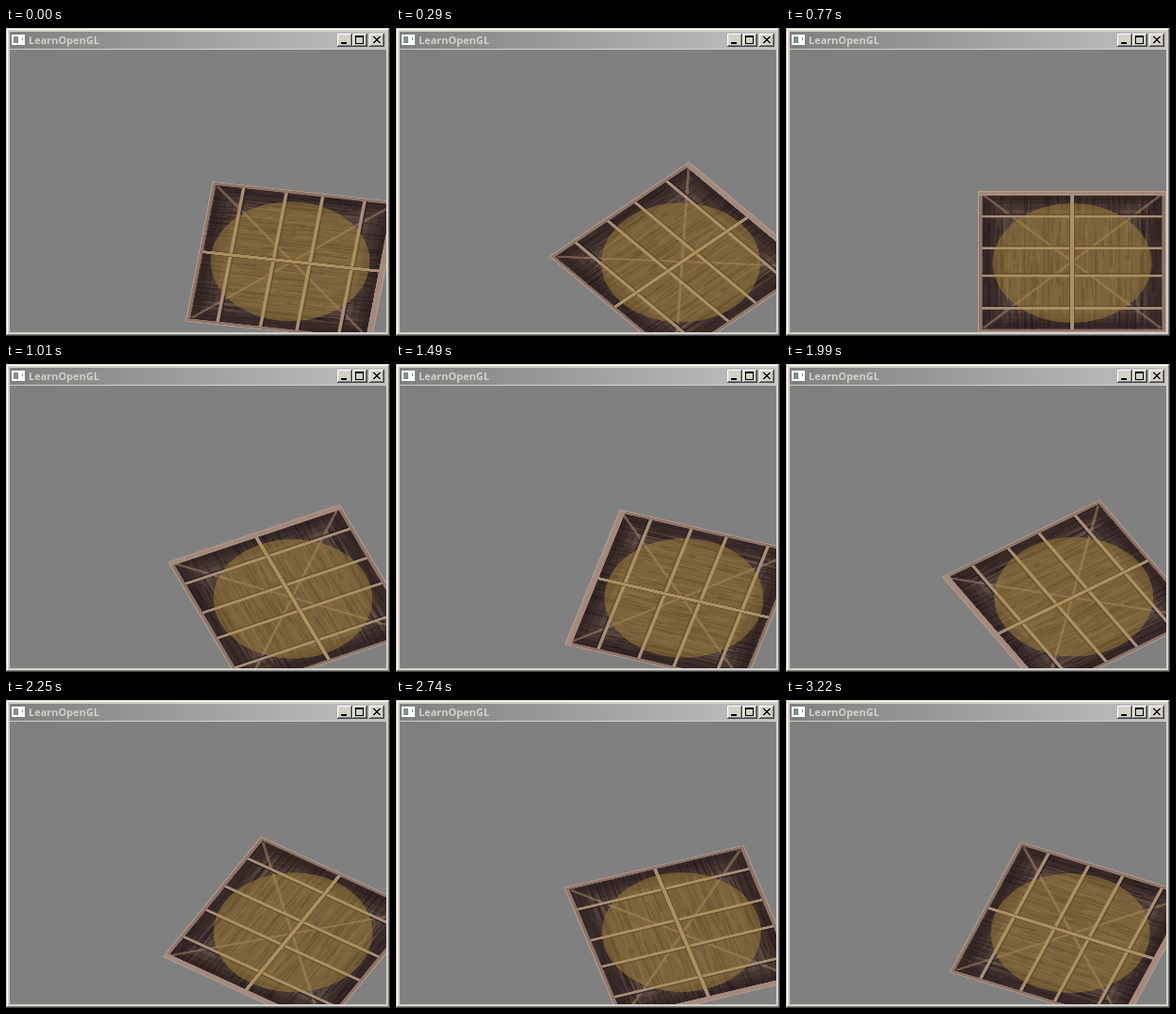
An HTML page with a canvas for the animation above (3.47 s loop, 408 by 327 pixels).

```html
<!DOCTYPE html>
<html lang="en">
<head>
<meta charset="utf-8">
<title>LearnOpenGL</title>
<style>
  html, body { margin: 0; width: 100%; height: 100%; overflow: hidden; background: #d4d0c8; }
  svg, canvas { position: absolute; left: 0; top: 0; display: block; }
  canvas { left: 4px; top: 23px; }
  text { font: 700 11px "Open Sans", sans-serif; fill: #d4d0c8; }
</style>
</head>
<body>
<svg width="408" height="327" shape-rendering="crispEdges">
  <defs>
    <linearGradient id="caption">
      <stop stop-color="#808080"/>
      <stop offset="1" stop-color="#c0c0c0"/>
    </linearGradient>
    <g id="button">
      <path fill="#404040" d="M0 0h16v14H0z"/>
      <path fill="#fff" d="M0 0h15v13H0z"/>
      <path fill="#808080" d="M1 1h14v12H1z"/>
      <path fill="#d4d0c8" d="M1 1h13v11H1z"/>
    </g>
  </defs>
  <path fill="#404040" d="M0 0h408v327H0z"/>
  <path fill="#d4d0c8" d="M0 0h407v326H0z"/>
  <path fill="#808080" d="M1 1h406v325H1z"/>
  <path fill="#fff" d="M1 1h405v324H1z"/>
  <path fill="#d4d0c8" d="M2 2h404v323H2z"/>
  <path fill="url(#caption)" d="M4 4h400v18H4z"/>
  <path fill="#fff" d="M6 7h14v11H6z"/>
  <path fill="#78908d" d="M8 9h5v7H8zM17 10h1v3h-1z"/>
  <text x="24" y="17">LearnOpenGL</text>
  <use href="#button" x="352" y="6"/>
  <use href="#button" x="368" y="6"/>
  <use href="#button" x="386" y="6"/>
  <path d="M356 15h6v2h-6z"/>
  <path fill-rule="evenodd" d="M371 8h9v9h-9zM372 10v6h7v-6z"/>
  <path d="M389.5 9h2l7 7h-2zM396.5 9h2l-7 7h-2z"/>
</svg>
<canvas id="view" width="400" height="300"></canvas>
<script>
const LOOP = 3470;
const STEPS = [0, 40, 290, 530, 770, 1010, 1250, 1490, 1740, 1990, 2250, 2490, 2740, 2980, 3220];
const ANGLES = [81.7, 107, 132, 156, 180, 204, 228.5, 253, 278, 303, 328.5, 353, 377.5, 402.5, 427.8];

let seed = 11;
const random = () => (seed = seed * 16807 % 2147483647) / 2147483647;

// The crate is painted once, in units from -100 to 100.
function paintCrate() {
  const canvas = document.createElement("canvas");
  canvas.width = canvas.height = 400;
  const c = canvas.getContext("2d");
  c.setTransform(2, 0, 0, 2, 200, 200);

  const rect = (color, x, y, w, h) => {
    c.fillStyle = color;
    c.fillRect(x, y, w, h);
  };
  const line = (color, width, x1, y1, x2, y2) => {
    c.strokeStyle = color;
    c.lineWidth = width;
    c.beginPath();
    c.moveTo(x1, y1);
    c.lineTo(x2, y2);
    c.stroke();
  };

  rect("#53423b", -100, -100, 200, 200);
  for (let i = 0; i < 650; i++) {
    const color = random() < .5 ? "rgba(36,25,26,.35)" : "rgba(126,102,88,.3)";
    rect(color, random() * 200 - 100, random() * 220 - 120, .7 + random() * 1.5, 10 + random() * 40);
  }
  for (let x = -75; x < 100; x += 25) line("rgba(32,22,24,.5)", 1.2, x, -95, x, 95);

  // Shadow inside the frame
  c.strokeStyle = "rgba(28,19,23,.25)";
  for (const width of [8, 14, 22]) {
    c.lineWidth = width;
    c.strokeRect(-95 + width / 2, -95 + width / 2, 190 - width, 190 - width);
  }

  // Braces and slats
  for (const side of [-1, 1]) line("rgba(146,118,96,.65)", 3, -94, -94 * side, 94, 94 * side);
  for (const y of [-66, -20, 19, 64]) {
    line("rgba(36,26,28,.7)", 2, -96, y + 2.5, 96, y + 2.5);
    line("#a78e78", 3.4, -96, y, 96, y);
  }
  line("rgba(42,30,30,.7)", 6, 0, -96, 0, 96);
  line("#a78e78", 4, 0, -96, 0, 96);

  // Frame
  rect("#8c7468", -100, -100, 200, 4);
  rect("#8c7468", -100, -100, 4.5, 200);
  rect("#8c7468", 95.5, -100, 4.5, 200);
  rect("#a38a7d", -100, 93, 200, 7);
  c.strokeStyle = "#b89e8e";
  c.lineWidth = 1;
  c.strokeRect(-99.5, -99.5, 199, 199);

  c.fillStyle = "rgba(180,146,60,.42)";
  c.beginPath();
  c.arc(0, -2, 84.5, 0, 2 * Math.PI);
  c.fill();
  return canvas;
}

const crate = paintCrate();
const ctx = document.getElementById("view").getContext("2d");

function draw() {
  const time = performance.now() % LOOP;
  const step = STEPS.findLastIndex(start => start <= time);
  ctx.resetTransform();
  ctx.fillStyle = "#808080";
  ctx.fillRect(0, 0, 400, 300);
  ctx.translate(300, 225);
  ctx.scale(1, .75);
  ctx.rotate(-ANGLES[step] * Math.PI / 180);
  ctx.drawImage(crate, -100, -100, 200, 200);
  requestAnimationFrame(draw);
}
draw();
</script>
</body>
</html>
```
